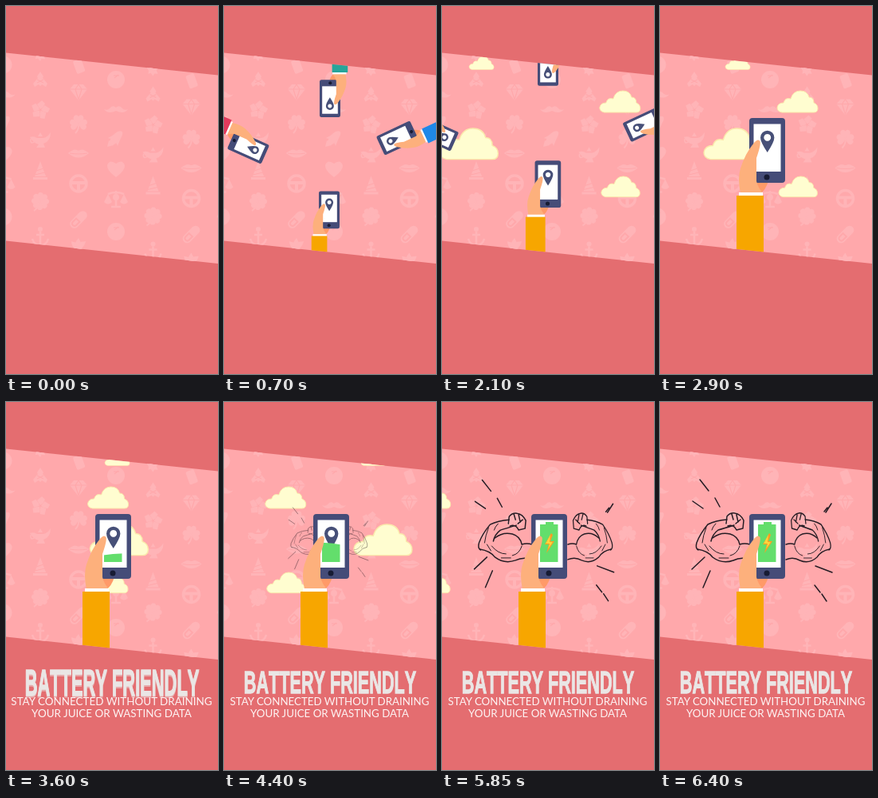
An HTML page for the animation above (7000 ms loop, 266 by 460 pixels).

```html
<!DOCTYPE html>
<html lang="en">
<head>
<meta charset="utf-8">
<title>Battery friendly</title>
<style>
html, body { margin: 0; width: 100%; height: 100%; overflow: hidden; background: #e46d70; }
svg { display: block; width: 266px; height: 460px; }
.title { font: bold 38px "Liberation Sans", Arial, sans-serif; font-kerning: none; fill: #eae6e5; stroke: #eae6e5; stroke-width: 1.3px; }
.sub { font: 13.3px Lato, "Open Sans", sans-serif; fill: #fdf3f3; }
text { text-anchor: middle; }
</style>
</head>
<body>
<svg viewBox="0 0 266 460" xmlns="http://www.w3.org/2000/svg">
  <defs>
    <clipPath id="band"><path d="M0 58.5L266 86.5V322L0 293.5Z"/></clipPath>
    <clipPath id="level"><path id="fill"/></clipPath>
    <path id="cloud" d="M6 27Q0 26 0 21Q1 15 8 15Q10 8 17 10Q20 0 29 0Q38 0 40 8Q46 8 46 15Q51 17 51 22Q51 27 46 27Z" fill="#fffdd0" stroke="#fae9ac"/>
    <g id="phone">
      <path d="M112 219H136Q132 231 126 234H112Z" fill="#ff9a68"/>
      <rect x="112" y="140" width="45" height="81" rx="4" fill="#454c78"/>
      <rect x="117.5" y="147.5" width="34" height="59.5" fill="#fff"/>
      <circle cx="134" cy="214" r="3.5" fill="#171b33"/>
      <path d="M134.7 183Q126 170 126 164.5A8.7 8.7 0 0 1 143.4 164.5Q143.4 170 134.7 183ZM134.7 160A4.4 4.4 0 1 0 134.8 160Z" fill="#475078" fill-rule="evenodd"/>
    </g>
    <g id="hand">
      <path d="M118 171Q123 165 125.500 169Q127 173 121 190V219Q123 227 129 234H101Q97 215 101 203Q107 184 118 171Z" fill="#fdb07c"/>
      <rect x="99" y="233" width="30" height="4.500" fill="#fff"/>
      <rect x="96" y="237" width="34" height="260"/>
    </g>
    <g id="flex">
      <path d="M83 152L84 143Q88 138 94 139Q101 140 105 148L104 158L96 160Q92 152 85 155M90 140L92 147M96 141L98 150M101 147L95 152"/>
      <path d="M84 147Q70 148 60 153Q50 165 46 176Q44 183 48 185M93 154Q80 158 73 160Q66 165 64 174"/>
      <path d="M66 170Q76 162 88 165Q98 168 100 178Q106 176 113 178M47 184Q60 186 66 194Q78 203 92 198Q102 193 113 197"/>
      <path d="M58 157Q54 167 53 176M62 180Q70 190 80 190M88 192Q97 190 100 180M70 152Q66 156 65 160M56 178L61 186M74 195L86 195" stroke-width="1"/>
    </g>
  </defs>
  <rect width="266" height="460" fill="#e46d70"/>
  <g clip-path="url(#band)">
    <rect y="50" width="266" height="280" fill="#ffa8ab"/>
    <g id="pattern" fill="#ffb4b7" stroke="none"></g>
    <g id="clouds"></g>
    <g id="muscles" fill="none" stroke="#251c24" stroke-width="1.5" stroke-linecap="round" stroke-linejoin="round">
      <use href="#flex"/>
      <use href="#flex" transform="matrix(-.83 0 0 1 251.8 0)"/>
      <path d="M50 97L61 111M69 120L75 131M41 124L54 133M40 209L56 194M54 232L63 211M208 138L215 127M206 137L210 132M195 205L216 213M194 229L201 238M203 240L209 249"/>
    </g>
    <g id="arms"></g>
  </g>
  <g id="caption">
    <g id="title"><text class="title" id="ghost" transform="scale(.57 1)" y="13.5">BATTERY FRIENDLY</text><text class="title" transform="scale(.57 1)" y="13.5">BATTERY FRIENDLY</text></g>
    <text class="sub" x="132.500" y="378.700">STAY CONNECTED WITHOUT DRAINING</text>
    <text class="sub" x="132.500" y="393.700">YOUR JUICE OR WASTING DATA</text>
  </g>
</svg>
<script>
const $ = id => document.getElementById(id);
const put = (el, transform) => el.setAttribute('transform', transform);

function add(parent, markup) {
  parent.insertAdjacentHTML('beforeend', markup);
  return parent.lastElementChild;
}

// Background icons, each drawn around 0,0
const path = (d, extra = '') => `<path d="${d}" ${extra}/>`;
const line = (d, width = 2.5, color = '#ffb4b7') => path(d, `fill="none" stroke="${color}" stroke-width="${width}"`);
const cut = (d, width = 1.2) => line(d, width, '#ffa8ab');
const spin = (d, n, step = 360 / n, from = 0) =>
  Array.from({ length: n }, (_, i) => path(d, `transform="rotate(${from + i * step})"`)).join('');
const leafHeart = 'M0 0Q-9-5-5.500-9.500Q-2-12 0-9Q2-12 5.500-9.500Q9-5 0 0Z';

const icon = {
  robe: path('M0-10L4-4 3-2 9 5 7 9 2 6 0 8-2 6-7 9-9 5-3-2-4-4Z') + cut('M-4 0L4 4M4 0L-4 4'),
  pinwheel: spin('M0-1L-4-7 2-12 6-8 3-3Z', 5),
  lamp: path('M-13-3Q-8-5-4-2H4Q9-3 13-9Q13 2 4 5L6 10H-5L-2 6Q-9 4-13-3ZM-3-4L0-9 3-4Z') + line('M-6 2Q-13 7-12-1', 1.5),
  hat: path('M0-12L7 7H-7ZM-9 8H9V11H-9Z') + cut('M-5 0L4-3M-7 5L6 2'),
  clover: spin(leafHeart, 4, 90, 25) + line('M0 0Q-2 8-8 12', 2),
  anchor: line('M0-7V10M-5-3H5M-10 2Q-8 10 0 10Q8 10 10 2') + '<circle cy="-10" r="3"/>',
  tag: '<rect x="-5" y="-8" width="11" height="17" rx="2" transform="rotate(-20)"/>',
  gem: path('M-6-10H6L11-4 0 10-11-4Z') + cut('M-11-4H11M-4-4L0 9 4-4 0-10Z'),
  shamrock: spin(leafHeart, 3, 100, -100) + line('M0 0Q1 7-4 12', 2),
  lips: path('M-13 0Q-6-6-2-4Q0-3 2-4Q6-6 13 0Q0 11-13 0Z') + cut('M-11 0Q0 2 11 0'),
  wheel: '<circle r="10" fill="none" stroke="#ffb4b7" stroke-width="3.500"/>' + line('M-9-1H9M0 0V9', 4),
  pill: '<g transform="rotate(45)"><rect x="-5.500" y="-13" width="11" height="26" rx="5.500"/>' + cut('M-3 1H3V7A3 3 0 0 1-3 7Z', 2) + '</g>',
  sprout: spin('M0 8Q-9-2 0-12Q7-2 0 8Z', 3, 50, -50),
  ball: '<circle r="11"/>' + cut('M-3-5H4M-2-2L3-6'),
  whiskers: path('M0-2Q4-6 8-1Q11 2 15 0Q10 7 0 2Q-10 7-15 0Q-11 2-8-1Q-4-6 0-2Z'),
  rocket: '<ellipse rx="5" ry="11" transform="rotate(42)"/>' + path('M-10 0L-1-5-3 2ZM2 10L6 0-1 3ZM-11 11L-9 3-3 9Z'),
  heart: path('M0 11Q-12 2-11-4Q-8-12 0-6Q8-12 11-4Q12 2 0 11Z'),
  scales: line('M0-10V9M-10-6Q0-10 10-6M-6 10H6', 2.5) + path('M-10-6L-15 4Q-10 9-5 4ZM10-6L5 4Q10 9 15 4Z') + '<circle cy="-2" r="4"/>'
};
const columns = [
  [43, { robe: 92, pinwheel: 130, lamp: 167, hat: 206, clover: 244, anchor: 289 }, ['sprout', 61]],
  [91, { tag: 75, gem: 108, shamrock: 147, lips: 184, wheel: 222, pill: 267, sprout: 302 }],
  [138, { ball: 92, whiskers: 129, rocket: 165, heart: 203, scales: 241 }, ['ball', 282]]
];
for (let k = -1; k < 2; k++) {
  for (const [x, rows, extra] of columns) {
    const list = Object.entries(rows).concat(extra ? [extra] : []);
    for (const [name, y] of list) {
      add($('pattern'), `<g transform="translate(${x + k * 141.5} ${y + k * 18.5})">${icon[name]}</g>`);
    }
  }
}

// Clouds: left edge at 2900 ms, top, scale, speed in px/ms
const clouds = [
  [82, 63, .61, .06],
  [55, 153, 1.43, .072],
  [147, 106, 1, -.0635],
  [149, 213, .95, -.0635]
].map(c => [add($('clouds'), '<use href="#cloud"/>'), ...c]);

// Arms: phone centre, angle, sleeve colour
const small = .578;
const battery = `<g clip-path="url(#level)"><path d="M130 153V150H140V153H145.500V200H123V153Z" fill="#63de6c"/></g>
  <g id="bolt"><path d="M137 164L129 178H134L131 189L141 174H136L139 166Z" fill="#ff9b22"/><path d="M136 166L130 177H135L133 184L139 175H135Z" fill="#ffd53c"/></g>`;
const arms = [
  [133, 125, 180, '#26a59a'],
  [39, 180, 114, '#e23a5c'],
  [209, 169, 245, '#1f88e8'],
  [132, 245.5, 0, '#f7a600']
].map(([x, y, angle, color], i) => {
  const el = add($('arms'), `<g fill="${color}"><use href="#phone"/>${i === 3 ? battery : ''}<use href="#hand"/></g>`);
  return { el, x, y, angle };
});

const clamp = p => Math.max(0, Math.min(1, p));
const out = p => 1 - (1 - p) ** 3;
const inOut = p => p * p * (3 - 2 * p);
const linear = p => p;

// Value at time t on a list of [time, value] keys
function track(t, keys, ease = linear) {
  let [t0, v0] = keys[0];
  for (const [t1, v1] of keys) {
    if (t < t1) return v0 + (v1 - v0) * ease(clamp((t - t0) / (t1 - t0)));
    [t0, v0] = [t1, v1];
  }
  return v0;
}

function drawArms(t) {
  const enter = track(t, [[300, 92], [1050, 0]], out);
  const leave = track(t, [[1800, 0], [2450, 110]], inOut);
  const grow = track(t, [[1800, 0], [2550, 1]], inOut);
  arms.forEach(({ el, x, y, angle }, i) => {
    const main = i === 3;
    const shift = enter + (main ? 0 : leave);
    const g = main ? grow : 0;
    const scale = small + (1 - small) * g;
    put(el, `translate(${x + 2.5 * g} ${y - 65 * g}) rotate(${angle}) translate(0 ${shift}) scale(${scale}) translate(-134.5 -180.5)`);
  });
}

function drawBattery(t) {
  const top = track(t, [[3300, 201], [3600, 190.5], [4400, 177], [5300, 158], [5650, 148]]);
  const tilt = 1.6 * Math.sin((t - 3900) / 300) * clamp((5650 - t) / 200);
  $('fill').setAttribute('d', `M120 ${top - tilt}Q134 ${top - 1} 148 ${top + tilt}V201H120Z`);
  const s = track(t, [[4900, 0], [5300, .68], [5700, 1]]);
  put($('bolt'), `translate(134.5 189) scale(${s}) translate(-134.5 -189)`);
}

function drawMuscles(t) {
  const frame = t / 50;
  const shake = t > 4850 && frame % 2 ? .006 * Math.sin(frame * 2.3) : 0;
  const s = track(t, [[4150, .3], [4400, .57], [4700, 1.04], [4850, 1]]) + shake;
  $('muscles').style.opacity = track(t, [[4150, 0], [4400, .5], [4650, 1]]);
  put($('muscles'), `translate(134.5 178) scale(${s}) translate(-134.5 -178)`);
}

function drawCaption(t) {
  const s = track(t, [[2950, .5], [3300, .975], [3600, 1.01], [3900, 1]], inOut);
  const tall = track(t, [[2950, 1], [3350, 1.2], [3600, 1.2], [3950, 1]], inOut);
  $('caption').style.opacity = track(t, [[2950, 0], [3300, 1]]);
  put($('caption'), `translate(132.5 366) scale(${s}) translate(-132.5 -366)`);
  put($('title'), `translate(133 350.5) scale(1 ${tall})`);
  $('ghost').style.opacity = tall > 1 ? .5 : 0;
  $('ghost').setAttribute('y', 13.5 + (tall - 1) * 8);
}

function draw(now) {
  const t = Math.min(6400, Math.floor(now % 7000 / 50) * 50);
  for (const [el, x, y, scale, speed] of clouds) {
    put(el, `translate(${x + (t - 2900) * speed} ${y}) scale(${scale})`);
  }
  drawArms(t);
  drawBattery(t);
  drawMuscles(t);
  drawCaption(t);
}

const start = performance.now();
function tick() {
  draw(performance.now() - start);
  requestAnimationFrame(tick);
}
tick();
</script>
</body>
</html>
```
